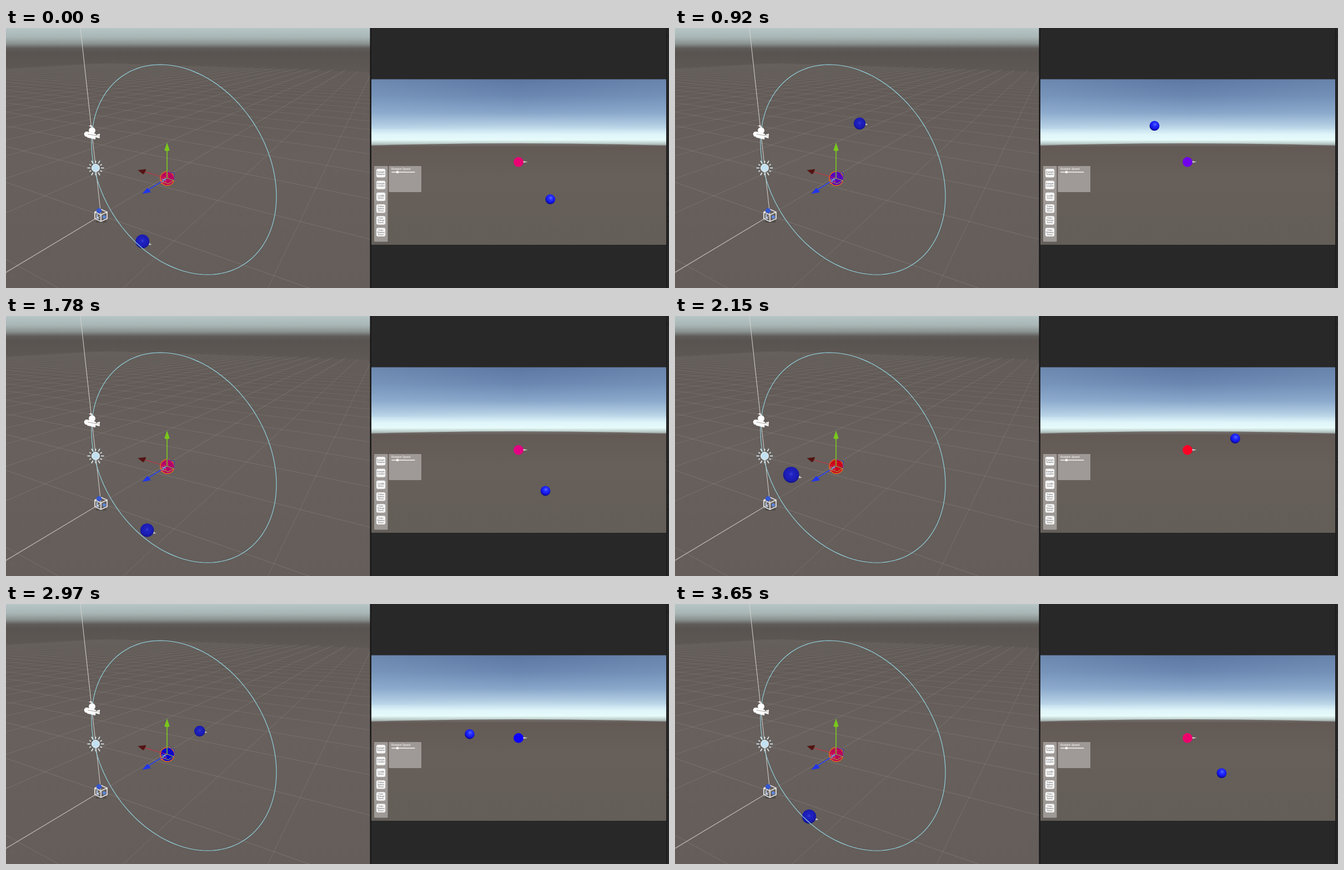
An HTML page that plays this animation: 1194x469 px, repeating every 3820 ms.

```html
<!DOCTYPE html>
<html lang="en">
<head>
<meta charset="utf-8">
<title>Orbit demo</title>
<style>
html, body { margin: 0; width: 100%; height: 100%; overflow: hidden; background: #282828; }
svg { display: block; width: 100vw; height: 100vh; }
text { font-family: "Liberation Sans", Arial, sans-serif; }
</style>
</head>
<body>
<svg viewBox="0 0 1194 469" preserveAspectRatio="none">
  <defs>
    <linearGradient id="haze" x1="0" y1="0" x2="0" y2="469" gradientUnits="userSpaceOnUse">
      <stop offset="0" stop-color="#b7c5c6"/>
      <stop offset=".035" stop-color="#a9b6b6"/>
      <stop offset=".06" stop-color="#8b9391"/>
      <stop offset=".078" stop-color="#5f5c59"/>
      <stop offset=".095" stop-color="#595450"/>
      <stop offset=".2" stop-color="#615a56"/>
      <stop offset=".5" stop-color="#67605c"/>
      <stop offset="1" stop-color="#645d5a"/>
    </linearGradient>
    <linearGradient id="sky" x1="0" y1="92" x2="0" y2="214" gradientUnits="userSpaceOnUse">
      <stop offset="0" stop-color="#5c77a2"/>
      <stop offset=".25" stop-color="#6a87b1"/>
      <stop offset=".5" stop-color="#87a5c9"/>
      <stop offset=".68" stop-color="#b3cee3"/>
      <stop offset=".82" stop-color="#dff5fa"/>
      <stop offset=".9" stop-color="#e6fbfa"/>
      <stop offset=".96" stop-color="#b5c5c3"/>
      <stop offset="1" stop-color="#7b7b77"/>
    </linearGradient>
    <linearGradient id="side" x1="658" x2="1189" y1="0" y2="0" gradientUnits="userSpaceOnUse">
      <stop offset="0" stop-color="#a4c2dc" stop-opacity=".22"/>
      <stop offset=".5" stop-color="#a4c2dc" stop-opacity="0"/>
      <stop offset="1" stop-color="#a4c2dc" stop-opacity=".16"/>
    </linearGradient>
    <linearGradient id="soil" x1="0" y1="207" x2="0" y2="391" gradientUnits="userSpaceOnUse">
      <stop offset="0" stop-color="#7a7773"/>
      <stop offset=".04" stop-color="#635a56"/>
      <stop offset=".35" stop-color="#675f5a"/>
      <stop offset="1" stop-color="#635e57"/>
    </linearGradient>
    <radialGradient id="dim" cx=".5" cy=".45" r=".55">
      <stop offset="0" stop-color="#3a3fd0"/>
      <stop offset=".25" stop-color="#2022c0"/>
      <stop offset=".75" stop-color="#1a1bb2"/>
      <stop offset="1" stop-color="#131484"/>
    </radialGradient>
    <radialGradient id="lit" cx=".55" cy=".36" r=".65">
      <stop offset="0" stop-color="#5c6cff"/>
      <stop offset=".3" stop-color="#2530ff"/>
      <stop offset=".7" stop-color="#1313e6"/>
      <stop offset="1" stop-color="#080876"/>
    </radialGradient>
    <clipPath id="scene"><rect width="656" height="469"/></clipPath>
    <clipPath id="game"><rect x="658" y="92.5" width="531" height="298.5"/></clipPath>
  </defs>

  <rect width="1194" height="469" fill="#282828"/>

  <g clip-path="url(#scene)">
    <rect width="656" height="469" fill="url(#haze)"/>
    <g id="grid" fill="none" stroke="#b9b6b2"></g>
    <path d="M134 0L171 338L0 441" fill="none" stroke="#d5d3cf" stroke-width="1"/>
    <g id="orb">
      <path id="tip" d="M.8 -.23L1.42 0L.8 .23Z" fill="#c4c4c8"/>
      <circle r="1" fill="url(#dim)"/>
    </g>
    <path id="ring" fill="none" stroke="#92d3e0" stroke-width="1.15"/>

    <g fill="#fff">
      <circle cx="155" cy="185" r="6"/>
      <circle cx="145.500" cy="191.500" r="4.800"/>
      <path d="M147 187.500L162 191L161 201L146 197.500ZM162 193L169 190.500L168.500 199L161.500 197Z"/>
      <path d="M149 177L153 175L157 179Z"/>
      <path d="M147 191.500L168 195" stroke="#8d8985" stroke-width=".8"/>
    </g>
    <g transform="translate(161.500 252.500)">
      <g id="rays" stroke="#dcecf3" stroke-width="1.700"></g>
      <circle r="7" fill="#c3e0f0" stroke="#eef7fb" stroke-width="1"/>
    </g>
    <g stroke-linejoin="round">
      <path d="M162 346H181V351H162Z" fill="#45413f" opacity=".6"/>
      <path d="M160 332L171 327L182 332V344L171 349L160 344ZM160 332L171 337L182 332M171 337V349" fill="none" stroke="#e3e3e3" stroke-width="1.800"/>
      <circle cx="167.500" cy="329.500" r="4.600" fill="#3556cf"/>
      <path d="M164 336V343H168" fill="none" stroke="#b9cdf2" stroke-width="2"/>
      <circle cx="177" cy="341" r="3" fill="#5b86dc"/>
    </g>

    <circle id="core" cx="290.500" cy="271.500" r="12"/>
    <circle cx="290.500" cy="271.500" r="12.700" fill="none" stroke="#e8671c" stroke-width="1.400"/>
    <g fill="none" stroke-width="1.200">
      <path d="M290 271V221" stroke="#7fd01f" stroke-width="1.500"/>
      <path d="M290 271L250 259.500" stroke="#dc2b3c" stroke-dasharray="3 1"/>
      <path d="M290 271L257 291.500" stroke="#2d45ee" stroke-width="1.700"/>
      <path d="M290 271L303 275L303 262L290 259" stroke="#2734ce" stroke-width="1"/>
      <path d="M290 271L302 275L292 281L279 276Z" stroke="#9fc431" stroke-width="1"/>
      <path d="M280 270L279 281L290 276" stroke="#e04a52" stroke-width="1"/>
      <path d="M281 272L288 275M282 278L287 270" stroke="#8fb4ee" stroke-width="1"/>
    </g>
    <path d="M290 206.500L294.700 220.500Q290 224 285.300 220.500Z" fill="#79c71d"/>
    <path d="M237.500 256.500L252 254.500Q251 261 247 264Z" fill="#541313"/>
    <path d="M245.500 299L254 288.500Q259 291 260.500 296.500Z" fill="#2336e6"/>
  </g>

  <rect x="655.500" width="2.500" height="469" fill="#181818"/>

  <g clip-path="url(#game)">
    <rect x="658" y="92" width="531" height="123" fill="url(#sky)"/>
    <rect x="658" y="92" width="531" height="90" fill="url(#side)"/>
    <path d="M658 212Q923 204 1189 212V391H658Z" fill="url(#soil)"/>
    <path d="M930 239.800L939.500 241.500L930 243.200Z" fill="#dcdcd8"/>
    <circle id="hub" cx="923" cy="241.700" r="8.900"/>
    <circle id="ball" r="8.900" fill="url(#lit)"/>
    <rect x="663" y="249" width="24.500" height="136.500" rx="1" fill="#fff" fill-opacity=".37"/>
    <rect x="689.500" y="249" width="58.500" height="47" rx="1" fill="#fff" fill-opacity=".37"/>
    <g id="buttons" text-anchor="middle" font-size="3.600" fill="#555"></g>
    <text x="694" y="256" font-size="5" fill="#fff">Rotation Speed</text>
    <rect x="694" y="259.200" width="42.500" height="1.500" rx=".7" fill="#f4f4f4"/>
    <circle cx="705" cy="260" r="2.300" fill="#fff"/>
  </g>
  <rect x="1189" width="1.500" height="469" fill="#1b1b1b"/>
  <path d="M1191 13.500H1194M1191 263.500H1194M1191 316.500H1194M1191 348.500H1194" stroke="#171717"/>
</svg>

<script>
const $ = id => document.getElementById(id);
const rad = Math.PI / 180;

function add(parent, tag, attrs, label) {
  const el = document.createElementNS("http://www.w3.org/2000/svg", tag);
  for (const key in attrs) el.setAttribute(key, attrs[key]);
  if (label) el.textContent = label;
  parent.append(el);
}

// Ground grid in perspective: origin plus two vanishing points
const origin = [171, 338], vpA = [680, 35], vpB = [-691, 37];
const stepA = 0.229, stepB = 0.1327;

function ground(u, v) {
  const a = u * stepA, b = v * stepB, w = 1 + a + b;
  return [0, 1].map(i => (origin[i] + a * vpA[i] + b * vpB[i]) / w);
}

function gridLine(from, to, alpha) {
  const [x1, y1] = from, [x2, y2] = to;
  add($("grid"), "line", { x1, y1, x2, y2, "stroke-opacity": alpha });
}

for (let n = -7; n <= 26; n++) {
  const fade = 0.24 / (1 + Math.abs(n) * 0.11);
  const nearU = (0.12 - 1 - n * stepB) / stepA;
  const nearV = (0.12 - 1 - n * stepA) / stepB;
  gridLine(ground(Math.max(nearU, -30), n), ground(28, n), fade);
  if (n > -4) gridLine(ground(n, Math.max(nearV, -60)), ground(n, 28), fade);
}

// Large circle seen at an angle
let path = "";
for (let i = 0; i < 120; i++) {
  const a = i * 3 * rad;
  const x = 320.5 + 166.5 * Math.cos(a), y = 255.5 + 189.5 * Math.cos(a - 75.2 * rad);
  path += (i ? "L" : "M") + x.toFixed(2) + " " + y.toFixed(2);
}
$("ring").setAttribute("d", path + "Z");

for (let i = 0; i < 12; i++) {
  add($("rays"), "line", { x1: 9.5, x2: i % 2 ? 13 : 15, transform: `rotate(${i * 30})` });
}

const labels = ["Example|Rotation", "Example|Location", "LookAt|Scene", "Follow|Sphere|Scene", "Color|Change|Scene", "Color|Rotation|Scene"];
labels.forEach((label, i) => {
  const y = 261.8 + i * 21.3, lines = label.split("|");
  add($("buttons"), "rect", { x: 667, y: y - 7.7, width: 16.2, height: 15.4, rx: 3, fill: "#f5f5f5" });
  lines.forEach((line, j) => add($("buttons"), "text",
    { x: 675.1, y: y + 1.2 + (j - (lines.length - 1) / 2) * 4 }, line));
});

const loop = 3820;
// Orbit angle in degrees at chosen steps
const keys = [[0, 49.6], [16, -61.4], [35, -196.2], [50, -303.3], [69, -436.8], [83, -535.5], [102, -674.1]];

function stepAt(t) {
  if (t < 30) return 0;
  const part = Math.floor((t - 20) / 540);
  const inner = Math.floor(((t - 20) % 540) / 36 + 0.25);
  return Math.min(102, 1 + part * 15 + Math.min(14, inner));
}

function angleAt(k) {
  const i = Math.max(1, keys.findIndex(key => key[0] >= k));
  const [k0, a0] = keys[i - 1], [k1, a1] = keys[i];
  return a0 + (a1 - a0) * (k - k0) / (k1 - k0);
}

// Blue to red, mixed in linear light
function mix(c, shade) {
  const level = v => Math.round(255 * shade * Math.max(0, v) ** 0.4545);
  return `rgb(${level((1 + c) / 2)},0,${level((1 - c) / 2)})`;
}

function draw(t) {
  const a = angleAt(stepAt(t)) * rad, c = Math.cos(a), s = Math.sin(a);
  $("ball").setAttribute("cx", 923 + 88.3 * c);
  $("ball").setAttribute("cy", 241.7 + 88.3 * s);

  const w = 1 - 0.185 * c + 0.06 * s;
  const x = (291.6 - 121.8 * c + 19.5 * s) / w;
  const y = (269.8 - 10.4 * c + 122.6 * s) / w;
  $("orb").setAttribute("transform", `translate(${x} ${y}) scale(${11.6 / w})`);
  const tilt = Math.atan2(y - vpB[1], x - vpB[0]) / rad;
  $("tip").setAttribute("transform", `rotate(${tilt})`);

  $("hub").setAttribute("fill", mix(c, 1));
  $("core").setAttribute("fill", mix(c, 0.8));
}

function tick() {
  draw(performance.now() % loop);
  requestAnimationFrame(tick);
}
tick();
</script>
</body>
</html>
```
